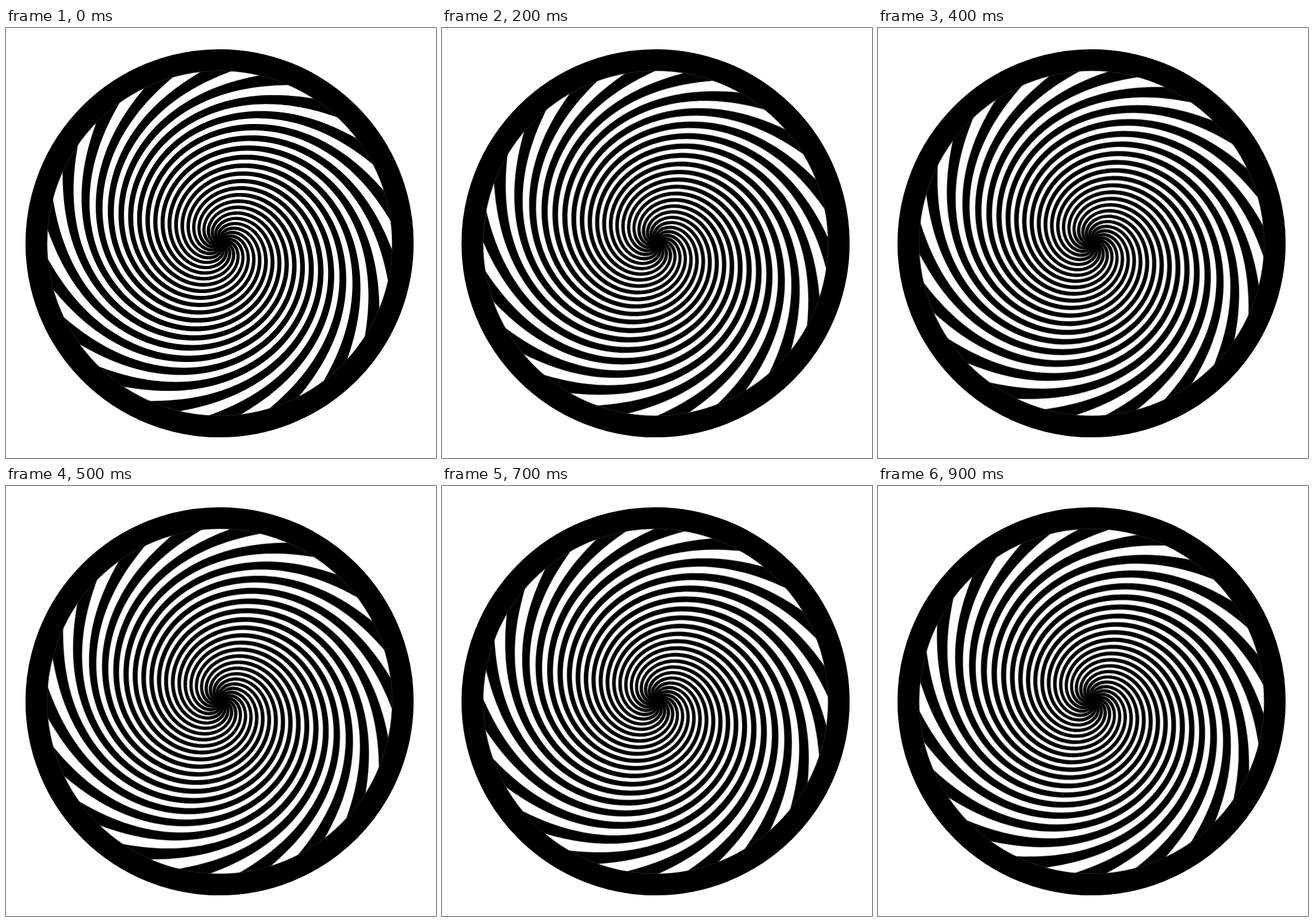
An HTML page that plays this animation: 748 by 748 pixels, repeating every 1 s.

```html
<!DOCTYPE html>
<html lang="en">
<head>
<meta charset="utf-8">
<title>Spiral</title>
<style>
  html, body { margin: 0; width: 100%; height: 100%; overflow: hidden; background: #fff; }
  svg { display: block; width: 100vw; height: 100vh; }
</style>
</head>
<body>
<svg viewBox="0 0 748 748">
  <circle cx="371.5" cy="374.5" r="319" fill="#000"/>
  <g transform="translate(374 374)"><path id="arms" fill="#fff"/></g>
  <circle cx="371.5" cy="374.5" r="318.8" fill="none" stroke="#000" stroke-width="37.6"/>
  <circle cx="371.8" cy="374.5" r="300" fill="none" stroke="#444" stroke-width="0.6"/>
</svg>
<script>
const ARMS = 18, RIM = 300, R_IN = 12, R_OUT = 308, LOOP = 1000;
const PITCH = 2 * Math.PI / ARMS;
const PHASE = 8.5 * Math.PI / 180;
const WHIRL = 7.05, REACH = 375;

// Straight rays whirled about the stage centre; the whirl fades out at REACH.
const twist = r => -WHIRL * (1 - r / REACH) ** 2;
const slope = r => 2 * WHIRL / REACH * (1 - r / REACH);

// White share of one pitch: half, less a constant edge, tapering at the hub.
function share(r) {
  const gap = PITCH / Math.hypot(slope(r), 1 / r);
  return (0.5 - 0.9 / gap) * Math.min(1, (r - R_IN) / 33);
}

// Angles run clockwise from the top.
const point = (r, a) => (r * Math.sin(a)).toFixed(2) + ' ' + (-r * Math.cos(a)).toFixed(2);

function arm(k) {
  const up = [], down = [];
  for (let r = R_IN; r <= R_OUT; r += 2) {
    const mid = PHASE + k * PITCH + twist(r) - twist(RIM);
    const half = share(r) * PITCH / 2;
    up.push(point(r, mid - half));
    down.unshift(point(r, mid + half));
  }
  return 'M' + up.concat(down).join('L') + 'Z';
}

const arms = document.getElementById('arms');
arms.setAttribute('d', Array.from({ length: ARMS }, (_, k) => arm(k)).join(''));
arms.style.transformOrigin = '0 0';
arms.animate(
  [{ transform: 'rotate(0deg)' }, { transform: `rotate(${-360 / ARMS}deg)` }],
  { duration: LOOP, iterations: Infinity, easing: 'steps(10, end)' }
);
</script>
</body>
</html>
```
